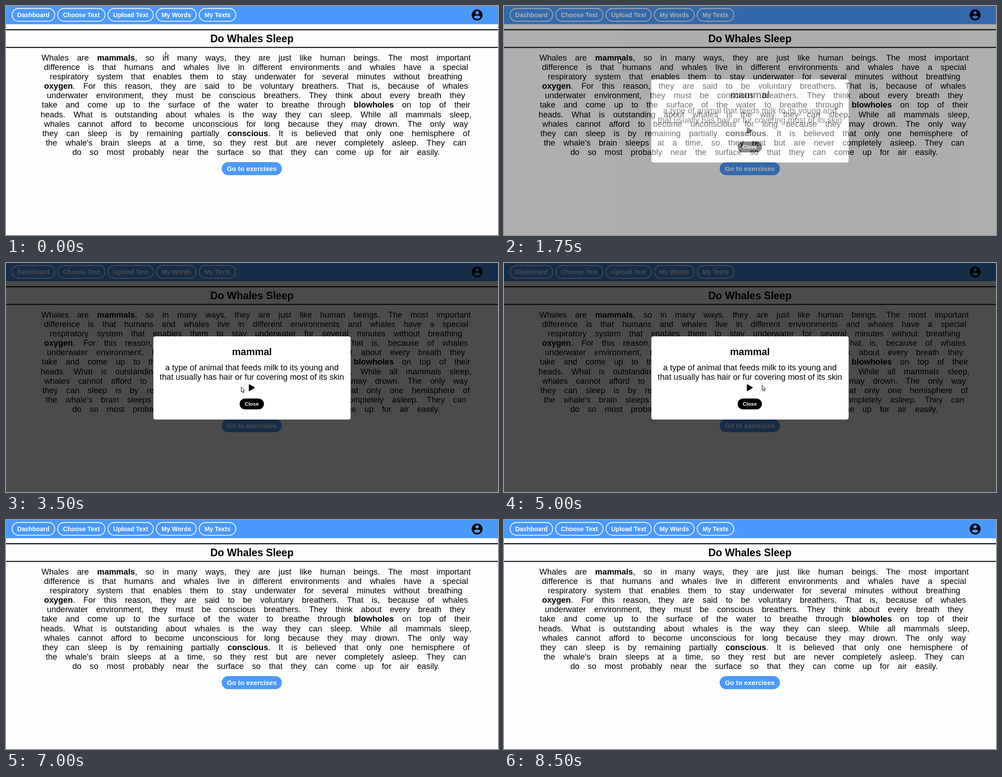
Write an HTML page that moves like this. It is 1095 px wide and 512 px high and loops after 9000 ms.

```html
<!DOCTYPE html>
<html lang="en">
<head>
<meta charset="utf-8">
<title>Reading page</title>
<style>
  html, body { margin: 0; width: 100%; height: 100%; overflow: hidden; background: #fefefe; }
  svg { display: block; width: 100%; height: 100%; }
  text { font-family: "Liberation Sans", Arial, sans-serif; text-anchor: middle; white-space: pre; }
  .bold, #story tspan { font-weight: bold; }
  #story text { font-size: 18.25px; word-spacing: 13.35px; }
  #nav text { font-size: 13.8px; font-weight: bold; fill: #fefefe; }
  #nav rect { fill: none; stroke: #f4f8ff; stroke-width: 1.8px; }
  .definition { font-size: 18.3px; }
  .cursor path { fill: #fff; stroke: #000; stroke-width: 1px; stroke-linejoin: round; }
</style>
</head>
<body>
<svg viewBox="0 0 1095 512" preserveAspectRatio="none">
  <rect width="1095" height="512" fill="#fefefe"/>
  <rect width="1095" height="40.7" fill="#4b99fa"/>
  <g id="nav"></g>

  <g transform="translate(1033.9 5.4) scale(1.22)">
    <circle cx="12" cy="12" r="10"/>
    <g fill="#4b99fa">
      <circle cx="12" cy="8" r="3"/>
      <path d="M12 19.2c-2.5 0-4.7-1.3-6-3.2 0-2 4-3.1 6-3.1s6 1.100 6 3.100c-1.300 1.900-3.500 3.200-6 3.200z"/>
    </g>
  </g>

  <path d="M0 53H1095M0 92.600H1095" stroke="#0a0a0c" stroke-width="2.300"/>
  <text class="bold" x="547.300" y="80.500" font-size="23">Do Whales Sleep</text>
  <g id="story"></g>

  <rect x="480" y="349" width="134" height="29.200" rx="14.600" fill="#4b99fa"/>
  <text class="bold" x="547" y="368.800" font-size="14.900" fill="#fefefe">Go to exercises</text>

  <g id="modal" opacity="0">
    <path id="shade" fill-opacity=".7" fill-rule="evenodd"/>
    <rect x="328" y="164" width="439" height="186" rx="5" fill="#fff"/>
    <text class="bold" x="547.300" y="206.300" font-size="21.900">mammal</text>
    <text class="definition" x="547.300" y="239.500">a type of animal that feeds milk to its young and</text>
    <text class="definition" x="547.300" y="260.500">that usually has hair or fur covering most of its skin</text>
    <path d="M541.500 272.200V285.300L552.500 278.700Z" stroke="#000" stroke-width="2" stroke-linejoin="round"/>
    <rect x="520" y="303" width="54" height="24.300" rx="12.150"/>
    <text class="bold" x="547" y="319" font-size="11.500" fill="#fff">Close</text>
  </g>

  <g id="arrow" class="cursor">
    <path d="M.5.500V11.800L3 9.500 4.700 13.600 6.600 12.800 4.900 8.800H8.300Z"/>
  </g>
  <g id="hand" class="cursor">
    <path d="M3.500 9.500V1.500q1.100-1.700 2.200 0V6q1.100-1 2 .3 1.100-.7 2 .5 1.700-.5 2 1V11q-.2 2-1.200 3.200v1.800H4.700v-1.500L.8 9.800q-.2-1.700 1.500-1.200Z"/>
    <path d="M6.600 9.500v3M8.500 9.500v3" style="stroke-width:.6px"/>
  </g>
</svg>
<script>
const LOOP = 9000;
const $ = id => document.getElementById(id);

function add(parent, tag, attrs) {
  const node = document.createElementNS('http://www.w3.org/2000/svg', tag);
  for (const key in attrs) node.setAttribute(key, attrs[key]);
  return parent.appendChild(node);
}

// label, left edge, right edge
[
  ['Dashboard', 13, 109],
  ['Choose Text', 114.5, 221],
  ['Upload Text', 226.5, 328.5],
  ['My Words', 334, 424],
  ['My Texts', 429.5, 512]
].forEach(([label, left, right]) => {
  add($('nav'), 'rect', { x: left + .5, y: 5.5, width: right - left - 1, height: 28.6, rx: 14.3 });
  add($('nav'), 'text', { x: (left + right) / 2, y: 24.7 }).textContent = label;
});

// Asterisks mark the vocabulary words.
[
  'Whales are *mammals*, so in many ways, they are just like human beings. The most important',
  'difference is that humans and whales live in different environments and whales have a special',
  'respiratory system that enables them to stay underwater for several minutes without breathing',
  '*oxygen*. For this reason, they are said to be voluntary breathers. That is, because of whales',
  'underwater environment, they must be conscious breathers. They think about every breath they',
  'take and come up to the surface of the water to breathe through *blowholes* on top of their',
  'heads. What is outstanding about whales is the way they can sleep. While all mammals sleep,',
  'whales cannot afford to become unconscious for long because they may drown. The only way',
  'they can sleep is by remaining partially *conscious*. It is believed that only one hemisphere of',
  "the whale's brain sleeps at a time, so they rest but are never completely asleep. They can",
  'do so most probably near the surface so that they can come up for air easily.'
].forEach((line, row) => {
  const text = add($('story'), 'text', { x: 556.5, y: 121.8 + row * 21.12 });
  line.split('*').forEach((part, i) => {
    if (i % 2) add(text, 'tspan').textContent = part;
    else text.append(part);
  });
});
const hoverWord = document.querySelector('#story tspan');

$('shade').setAttribute('d', 'M0 0H1095V512H0Z' +
  'M333 164H762a5 5 0 0 1 5 5V345a5 5 0 0 1-5 5H333a5 5 0 0 1-5-5V169a5 5 0 0 1 5-5Z');

// start time, cursor shape, left, top
const pointer = [
  [0, 'arrow', 354, 102.5],
  [250, 'arrow', 346, 108.5],
  [500, 'arrow', 310, 136.5],
  [750, 'hand', 271, 130.5],
  [1000, 'hand', 259, 111.5],
  [1250, 'hand', 254.5, 117],
  [1750, 'arrow', 254, 116],
  [2250, 'arrow', 260, 119],
  [2500, 'arrow', 330, 180.5],
  [2750, 'arrow', 406, 240.5],
  [3000, 'arrow', 439, 270],
  [3250, 'arrow', 490, 276],
  [3500, 'arrow', 523, 277],
  [3750, 'hand', 542, 282.5],
  [4000, 'hand', 545.5, 279.5],
  [5000, 'arrow', 574, 273],
  [5250, 'arrow', 583, 277],
  [5750, 'arrow', 584, 279],
  [6000, 'arrow', 578, 291],
  [6250, 'arrow', 566, 301],
  [6500, 'hand', 557, 314],
  [7000, 'none', 0, 0]
];
const modalOpacity = [[0, 0], [1750, .45], [2000, 1], [7000, 0]];
const wordColor = [[0, '#000'], [750, '#0a800a'], [1750, '#000']];

const stepAt = (steps, t) => steps.findLast(step => step[0] <= t);

function render(now) {
  const t = now % LOOP;
  const [, shape, x, y] = stepAt(pointer, t);
  for (const id of ['arrow', 'hand']) {
    $(id).setAttribute('visibility', id === shape ? 'visible' : 'hidden');
    $(id).setAttribute('transform', `translate(${x} ${y})`);
  }
  $('modal').setAttribute('opacity', stepAt(modalOpacity, t)[1]);
  hoverWord.setAttribute('fill', stepAt(wordColor, t)[1]);
}

const start = performance.now();
function tick() {
  render(performance.now() - start);
  requestAnimationFrame(tick);
}
tick();
</script>
</body>
</html>
```
